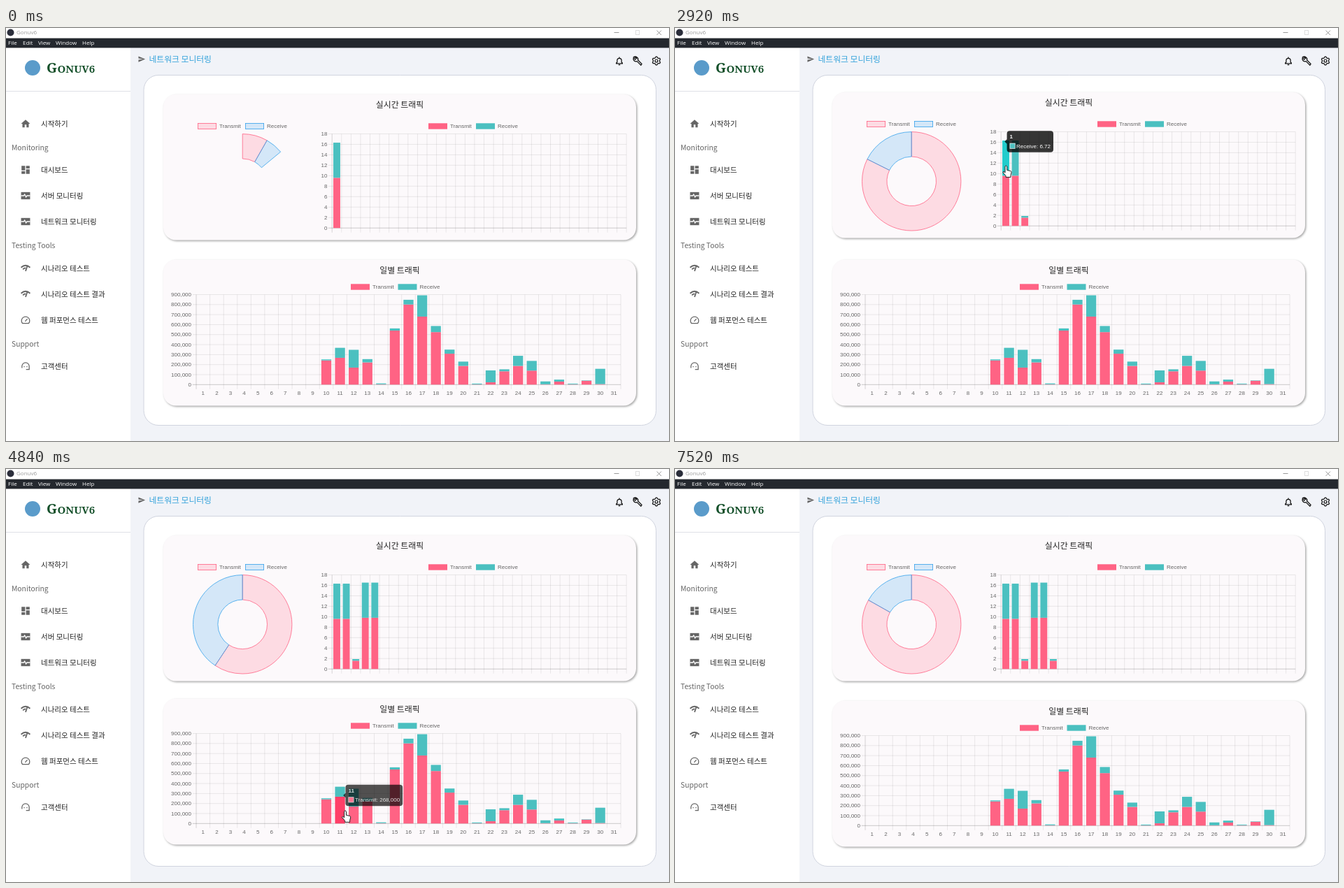
An HTML page with a canvas for the animation above (7630 ms loop, 948 px wide and 591 px high).

```html
<!DOCTYPE html>
<html lang="ko">
<head>
<meta charset="utf-8">
<title>Gonuv6</title>
<style>
html, body { margin: 0; width: 100%; height: 100%; overflow: hidden; background: #fff; }
canvas { display: block; }
</style>
</head>
<body>
<canvas id="stage" width="948" height="591"></canvas>
<script>
const g = document.getElementById('stage').getContext('2d');
const LOOP = 7630;
const LAG = 25;   // hover reacts this long after the pointer moves
const LIFT = 3;   // rise of a hovered card
const KR = '"Noto Sans CJK KR", "Noto Sans CJK", sans-serif';
const ARIAL = '"Liberation Sans", Arial, sans-serif';
const UI = '"Open Sans", sans-serif';
const SERIES = ['Transmit', 'Receive'];
const SOLID = ['#ff6384', '#4bc0c0'], HOT = ['#ff3f68', '#22cccc'];
const EDGE = ['#ff6384', '#36a2eb'];
const soft = (s, a) => `rgba(${s ? '54,162,235' : '255,99,132'},${a})`;

const easeOut = p => 1 - Math.pow(1 - Math.min(1, Math.max(0, p)), 4);
const smooth = p => p * p * (3 - 2 * p);
const mix = (a, b, p) => a + (b - a) * p;

// y is the vertical centre of the capitals
function text(s, x, y, size, color, { font = ARIAL, align = 'left', weight = 400 } = {}) {
  g.font = `${weight} ${size}px ${font}`;
  g.fillStyle = color;
  g.textAlign = align;
  g.fillText(s, x, y + size * 0.36);
}
function rect(x, y, w, h, color) {
  g.fillStyle = color;
  g.fillRect(x, y, w, h);
}
function round(x, y, w, h, r) {
  g.beginPath();
  g.roundRect(x, y, w, h, r);
}
function disc(x, y, r, color) {
  g.beginPath();
  g.arc(x, y, r, 0, 7);
  g.fillStyle = color;
  g.fill();
}
function line(x1, y1, x2, y2) {
  g.beginPath();
  g.moveTo(x1, y1);
  g.lineTo(x2, y2);
  g.stroke();
}

// ---- icons on a 24 unit grid; with a width the path is stroked
const ICONS = {
  home: ['M10 20v-6h4v6h5v-8h3L12 3 2 12h3v8z'],
  board: ['M3 3h8v10H3zM3 15h8v6H3zM13 3h8v6h-8zM13 11h8v10h-8z'],
  panel: ['M2 4h20v16H2z'],
  pulse: ['M2 12h6l2-3 3 6 2-3h7', 2],
  net: ['M2 10Q12 1 22 10M6 14Q9 11 12 11M16 6L12 18', 2.8],
  speed: ['M5 19a9 9 0 1 1 14 0zM11 15l5-6', 2],
  agent: ['M4 15v-3a8 8 0 0 1 16 0v7h-7M4 12v4M8 13h2M14 13h2', 2],
  send: ['M2 21L23 12 2 3v7l15 2-15 2z'],
  bell: ['M5 18v-1l2-2v-4a5 5 0 0 1 10 0v4l2 2v1zM12 3v2M10 21h4', 2],
  wrench: ['M21 19l-9-9c2-5-4-9-9-7L9 6 6 9 2 5c-2 5 3 10 8 8l9 9z', 2]
};
function icon(name, x, y, size, color) {
  const [d, width] = ICONS[name], path = new Path2D(d);
  g.save();
  g.translate(x - size / 2, y - size / 2);
  g.scale(size / 24, size / 24);
  g.fillStyle = g.strokeStyle = color;
  g.lineWidth = width;
  width ? g.stroke(path) : g.fill(path);
  g.restore();
}
function gear(x, y) {
  g.beginPath();
  for (let i = 0; i < 24; i++) {
    const a = (i + 1.5) * Math.PI / 12, r = i % 4 < 2 ? 6 : 4.6;
    g.lineTo(x + r * Math.cos(a), y + r * Math.sin(a));
  }
  g.closePath();
  g.moveTo(x + 2, y);
  g.arc(x, y, 2, 0, 7);
  g.strokeStyle = '#111';
  g.lineWidth = 1.2;
  g.stroke();
}

// ---- window frame, sidebar and header
const MENU = [['File', 3], ['Edit', 24], ['View', 46], ['Window', 71], ['Help', 109]];
const NAV = [
  ['시작하기', 137, 'home'], ['대시보드', 203, 'board'], ['서버 모니터링', 240, 'panel'],
  ['네트워크 모니터링', 277, 'panel'], ['시나리오 테스트', 344, 'net'],
  ['시나리오 테스트 결과', 381, 'net'], ['웹 퍼포먼스 테스트', 418, 'speed'], ['고객센터', 484, 'agent']
];
const GROUPS = [['Monitoring', 171], ['Testing Tools', 311], ['Support', 452]];

function drawFrame() {
  rect(0, 0, 948, 591, '#fff');
  rect(178, 28, 770, 563, '#f1f3f8');
  disc(6.5, 6.5, 5, '#2b2e3b');
  text('Gonuv6', 15, 6.5, 8, '#999', { font: UI });
  g.lineWidth = 1;
  g.strokeStyle = '#999';
  line(869.5, 6.5, 876.5, 6.5);
  line(930.5, 3.5, 937, 10);
  line(937, 3.5, 930.5, 10);
  g.strokeStyle = '#ddd';
  g.strokeRect(900.5, 3.5, 5, 6);
  rect(0, 14.6, 948, 13.8, '#24282e');
  for (const [s, x] of MENU) text(s, x, 21.5, 8, '#fff', { font: UI });

  disc(38, 57, 11, '#5a9bca');
  const serif = { font: '"Noto Serif", serif', weight: 600 };
  text('G', 58, 57.2, 19.5, '#14502a', serif);
  text('ONUV6', 73.5, 58.6, 15, '#14502a', serif);
  rect(0, 90, 178, 1, '#dfe1e6');

  for (const [s, y] of GROUPS) text(s, 8, y, 10.3, '#666', { font: KR });
  for (const [s, y, name] of NAV) {
    text(s, 50, y, 10.5, '#222', { font: KR });
    icon(name, 28, y, 15.5, '#666');
    if (name === 'panel') icon('pulse', 28, y, 15.5, '#fff');
  }
  icon('send', 194, 44.5, 11, '#666');
  text('네트워크 모니터링', 204.5, 45, 11.8, '#35a3db', { font: KR });
  icon('bell', 877, 47, 15, '#111');
  icon('wrench', 903.5, 47, 15, '#111');
  gear(930, 47);

  round(197, 67.5, 732.5, 501, 21);
  g.fillStyle = '#fff';
  g.fill();
  g.strokeStyle = '#d0d4df';
  g.lineWidth = 1;
  g.stroke();
}

// ---- chart data
const ARRIVALS = [-36, 900, 2345, 3265, 4760, 6240];
const arrived = t => ARRIVALS.filter(a => a <= t).length;
const sample = (_, i) => i % 3 === 2 ? [1.58, 0.32] : [i < 3 ? 9.6 : 9.8, 6.72];

// thousands per day, from the tenth day on
const SENT = [242, 268, 170, 222, 3, 540, 801.2, 680, 525, 309, 187, 2, 23, 133, 187, 140, 3, 30, 3, 38, 5];
const RECEIVED = [10, 100, 178, 33, 9, 22, 47, 213, 61, 41, 43, 8, 119, 20, 101, 97, 29, 20, 7, 4, 153];

const live = {
  title: '실시간 트래픽', y: 95, h: 208.5,
  x0: 466.2, x1: 887.2, y0: 286.2, top: 151.5, max: 18, step: 2, labelX: 459.5,
  legend: [604, 672, 140.5], data: ARRIVALS.map(sample), count: arrived, log: []
};
const daily = {
  title: '일별 트래픽', y: 331.5, h: 209,
  x0: 272, x1: 879, y0: 510.3, top: 381.5, max: 900, step: 100, labelX: 265, days: true,
  legend: [493, 560.5, 370.5], count: () => 31, log: [],
  data: Array.from({ length: 31 }, (_, i) => [SENT[i - 9] || 0, RECEIVED[i - 9] || 0])
};
const CHARTS = [live, daily];
const RING = { x: 338.2, y: 222.3, r: 70.7, hole: 35.3, legend: [274, 342, 140.5] };

const pitch = c => (c.x1 - c.x0) / 31;
const barWidth = c => pitch(c) * 0.73;
const barX = (c, i) => c.x0 + (i + 0.5) * pitch(c);
const valY = (c, v) => c.y0 - v * (c.y0 - c.top) / c.max;
const barTop = (c, i, s) => valY(c, c.data[i][0] + (s ? c.data[i][1] : 0));
const show = (c, v) => c.days ? Math.round(v * 1000).toLocaleString('en-US') : v;

// share of the ring taken by the first series
function shareAt(t) {
  const n = arrived(t) - 1;
  const share = i => live.data[i][0] / (live.data[i][0] + live.data[i][1]);
  return mix(share(Math.max(0, n - 1)), share(n), easeOut((t - ARRIVALS[n]) / 1000));
}

// ---- pointer: time, x, y
const PATH = [
  [100, 835, 592], [560, 497, 466], [1070, 396, 260], [1600, 372, 212], [2160, 298, 207],
  [2700, 474, 198], [3140, 474, 196], [3520, 484, 147], [3760, 484, 196], [4150, 500, 275],
  [4310, 502, 280], [4360, 545, 352], [4750, 477, 488], [4950, 497, 490], [5080, 500, 509],
  [5225, 565, 509], [5290, 596, 491], [5460, 600, 500], [6000, 900, 546], [6200, 916, 592]
];
function pointer(t) {
  const k = PATH.findIndex(p => p[0] > t);
  if (k < 1) return null;
  const [a, b] = [PATH[k - 1], PATH[k]], p = smooth((t - a[0]) / (b[0] - a[0]));
  return { x: mix(a[1], b[1], p), y: mix(a[2], b[2], p) };
}
function onCard(c, t) {
  const p = pointer(t);
  return !!p && p.x > 225 && p.x < 901 && p.y > c.y && p.y < c.y + c.h;
}

// ---- tooltips follow what the pointer touches
function tip(c, i, s, t) {
  const bar = i >= 0, value = c.data[bar ? i : arrived(t) - 1][s];
  const label = `${SERIES[s]}: ${show(c, value)}`;
  g.font = `8px ${ARIAL}`;
  const box = { i, s, label, w: g.measureText(label).width + 17.5, h: bar ? 30.5 : 18 };
  if (bar) return { ...box, x: barX(c, i) + 4.6, y: barTop(c, i, s) };
  const share = shareAt(t), a = Math.PI * (s ? 1 + share : share), r = (RING.r + RING.hole) / 2;
  const x = RING.x + r * Math.sin(a), y = RING.y - r * Math.cos(a);
  const right = x > RING.x;
  return { ...box, right, y, x: right ? x - 4.6 - box.w : x + 4.6 };
}
function touch(c, t) {
  if (!onCard(c, t)) return null;
  const p = pointer(t), x = p.x, y = p.y + LIFT;
  const i = Math.floor((x - c.x0) / pitch(c));
  if (i >= 0 && i < c.count(t) && Math.abs(x - barX(c, i)) < barWidth(c) / 2 && y < c.y0) {
    const s = [0, 1].find(s => y >= barTop(c, i, s));
    if (s !== undefined) return tip(c, i, s, t);
  }
  const dx = x - RING.x, dy = y - RING.y, d = Math.hypot(dx, dy);
  if (c !== live || d < RING.hole || d > RING.r) return null;
  const turn = (Math.atan2(dx, -dy) / (2 * Math.PI) + 1) % 1;
  return tip(c, -1, turn < shareAt(t) ? 0 : 1, t);
}
function tipState(e, t) {
  const p = easeOut((t - e.t) / 400);
  return { x: mix(e.from.x, e.tip.x, p), y: mix(e.from.y, e.tip.y, p), a: mix(e.from.a, e.on ? 1 : 0, p) };
}
// the hover history is fixed, so it is worked out once
for (const c of CHARTS) {
  for (let t = 0; t < LOOP; t += 4) {
    const last = c.log[c.log.length - 1], hit = touch(c, t - LAG);
    const same = hit && last && last.on && last.tip.i === hit.i && last.tip.s === hit.s;
    if (same || (!hit && !(last && last.on))) continue;
    const from = last ? tipState(last, t) : { x: hit.x, y: hit.y, a: 0 };
    c.log.push({ t, from, on: !!hit, tip: hit || last.tip });
  }
}

function drawTip(e, t) {
  const { i, s, w, h, label, right } = e.tip, bar = i >= 0;
  const { x, y, a } = tipState(e, t), top = y - h / 2;
  if (a < 0.01) return;
  g.save();
  g.globalAlpha = a;
  g.fillStyle = 'rgba(0,0,0,.8)';
  round(x, top, w, h, 4);
  const edge = right ? x + w : x;
  g.moveTo(edge, y - 3.3);
  g.lineTo(edge + (right ? 3.3 : -3.3), y);
  g.lineTo(edge, y + 3.3);
  g.fill('evenodd');
  if (bar) text(i + 1, x + 4, top + 8, 8, '#fff', { weight: 700 });
  const ly = top + (bar ? 21.5 : 9);
  rect(x + 4, ly - 4, 8, 8, '#fff');
  rect(x + 4.7, ly - 3.3, 6.6, 6.6, bar ? SOLID[s] : soft(s, 0.2));
  text(label, x + 13.5, ly, 8, '#fff');
  g.restore();
}

// ---- charts
function legend([xa, xb, y], fills, edges) {
  [xa, xb].forEach((x, s) => {
    rect(x, y - 4.2, 27, 8.4, fills[s]);
    if (edges) {
      g.strokeStyle = edges[s];
      g.lineWidth = 0.8;
      g.strokeRect(x + 0.4, y - 4, 26.2, 8);
    }
    text(SERIES[s], x + 31, y, 8, '#666');
  });
}
function drawBars(c, t, hot) {
  legend(c.legend, SOLID);
  g.lineWidth = 0.8;
  for (let i = 0; i <= 31; i++) {
    const x = c.x0 + i * pitch(c);
    g.strokeStyle = `rgba(0,0,0,${i ? 0.1 : 0.2})`;
    line(x, c.top, x, c.y0 + 6.5);
    if (c.days && i < 31) text(i + 1, barX(c, i), 522, 8, '#666', { align: 'center' });
  }
  for (let v = 0; v <= c.max; v += c.step) {
    const y = valY(c, v);
    g.strokeStyle = `rgba(0,0,0,${v ? 0.1 : 0.25})`;
    line(c.x0 - 5.5, y, c.x1, y);
    text(show(c, v), c.labelX, y - 0.3, 8, '#666', { align: 'right' });
  }
  const w = barWidth(c);
  for (let i = 0; i < c.count(t); i++) {
    for (let s = 0; s < 2; s++) {
      const y = barTop(c, i, s), base = s ? barTop(c, i, 0) : c.y0;
      const on = hot && hot.i === i && hot.s === s;
      rect(barX(c, i) - w / 2, y, w, base - y, (on ? HOT : SOLID)[s]);
    }
  }
}
function drawRing(t, hot) {
  legend(RING.legend, [soft(0, 0.2), soft(1, 0.2)], EDGE);
  const sweep = easeOut((t - ARRIVALS[0]) / 1000) * 2 * Math.PI;
  const ends = [0, shareAt(t) * sweep, sweep];
  for (let s = 0; s < 2; s++) {
    const a = ends[s] - Math.PI / 2, b = ends[s + 1] - Math.PI / 2;
    g.beginPath();
    g.arc(RING.x, RING.y, RING.r, a, b);
    g.arc(RING.x, RING.y, RING.hole, b, a, true);
    g.closePath();
    g.fillStyle = soft(s, hot && hot.i < 0 && hot.s === s ? 0.25 : 0.2);
    g.fill();
    g.strokeStyle = EDGE[s];
    g.lineWidth = 0.8;
    g.stroke();
  }
}
function drawCard(c, t) {
  const e = c.log.filter(e => e.t <= t).pop(), hot = e && e.on ? e.tip : null;
  g.save();
  if (onCard(c, t - LAG)) g.translate(0, -LIFT);
  g.save();
  g.shadowColor = 'rgba(0,0,0,.35)';
  g.shadowOffsetX = g.shadowOffsetY = 1.4;
  g.shadowBlur = 3;
  round(225, c.y, 676, c.h, 18);
  g.fillStyle = '#fcf9fb';
  g.fill();
  g.restore();
  text(c.title, 563, c.y + 15, 11.9, '#222', { font: KR, align: 'center' });
  if (c === live) drawRing(t, hot);
  drawBars(c, t, hot);
  if (e) drawTip(e, t);
  g.restore();
}

const HAND = new Path2D('M-2 2Q-2 0-.7 0T.8 2V6.5L5.500 7.5Q7.5 8 7 10L6 14V16.5H-1V14.5L-5 10Q-5.5 8.4-4 8.5L-2 10Z');
const ARROW = new Path2D('M0 0V11L2.6 8.6 4.3 12.4 6 11.6 4.4 8H8Z');

function drawPointer(t) {
  const p = pointer(t);
  if (!p) return;
  const shape = CHARTS.some(c => onCard(c, t)) ? HAND : ARROW;
  g.save();
  g.translate(p.x, p.y);
  g.fillStyle = '#fff';
  g.strokeStyle = '#222';
  g.lineWidth = 1;
  g.lineJoin = 'round';
  g.fill(shape);
  g.stroke(shape);
  g.restore();
}

function draw(t) {
  drawFrame();
  for (const c of CHARTS) drawCard(c, t);
  drawPointer(t);
}

const start = performance.now();
function tick() {
  draw((performance.now() - start) % LOOP);
  requestAnimationFrame(tick);
}
tick();
</script>
</body>
</html>
```
